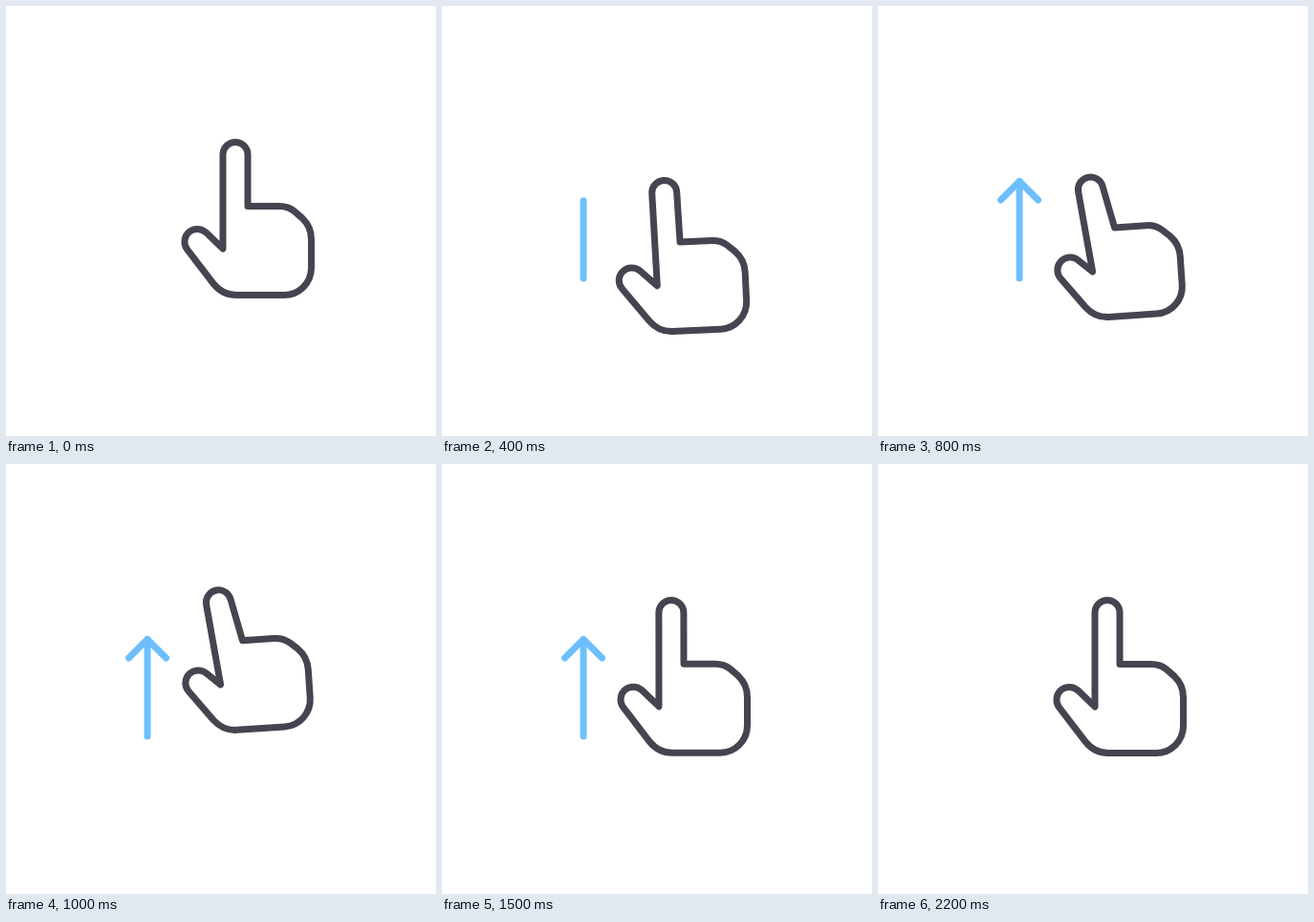
Animation, 450 px wide and 450 px high, one loop 2.4 s. Source, as an HTML page:

```html
<!DOCTYPE html>
<html lang="en">
<head>
<meta charset="utf-8">
<title>Swipe up</title>
<style>
  html, body { margin: 0; width: 100%; height: 100%; overflow: hidden; background: #fff; }
  svg { display: block; width: 100%; height: 100%; }
  path { fill: none; stroke-width: 7; stroke-linecap: round; stroke-linejoin: round; }
  #hand { stroke: #464450; }
  #arrow path { stroke: #6dbffc; }
</style>
</head>
<body>
<svg viewBox="0 0 450 450">
  <g id="arrow"><path id="stem"/><path id="head"/></g>
  <path id="hand"/>
</svg>
<script>
const LOOP = 2400, STEP = 100;
const DOWN_END = 618, UP_END = 1057, REST = 1527;
const LOW = 52.7, HIGH = -28.5, TILT = -3.9;
const [arrow, stem, head, hand] = ['arrow', 'stem', 'head', 'hand'].map(id => document.getElementById(id));

const ramp = (t, from, to) => Math.min(1, Math.max(0, (t - from) / (to - from)));
const ease = (t, from, to) => {
  const s = ramp(t, from, to);
  return s * s * (3 - 2 * s);
};

// curl bends the index finger and tucks the thumb, 0 = straight
function handPath(curl) {
  const at = (x, y, dx, dy) => `${x + dx * curl} ${y + dy * curl}`;
  const thumbRight = at(209.4, 237.1, 3.5, 4);
  const thumbLeft = at(189.5, 254.6, 3.5, 4);
  return `M${thumbRight} L227 254 L${at(227, 155.5, -9.2, 14.7)}
    A13 13 0 0 1 ${at(253, 155.5, -9.4, 10.5)} L253 209.5 H286
    Q295.5 209.5 302 215 L310 222 Q319.5 231 319.5 244 V274
    A28.5 28.5 0 0 1 291 302.5 H241 C231 302.5 223 298 217 290.5
    L${thumbLeft} A13.3 13.3 0 0 1 ${thumbRight} Z`;
}

function drawHand(t) {
  const down = ease(t, 0, DOWN_END);
  const y = LOW * down + (HIGH - LOW) * ease(t, DOWN_END, UP_END) - HIGH * ease(t, UP_END, REST);
  const tilt = TILT * (down - ease(t, UP_END, 1300));
  const curl = ease(t, 350, DOWN_END) - ease(t, UP_END, REST);
  hand.setAttribute('d', handPath(curl));
  hand.setAttribute('transform', `translate(0 ${y}) rotate(${tilt} 250 290)`);
}

function drawArrow(t) {
  const grow = ease(t, 100, 521);
  const spread = 19.5 * ease(t, 500, 620);
  stem.setAttribute('d', grow ? `M148 285 V${285 - 101.5 * grow}` : '');
  head.setAttribute('d', spread ? `M${148 - spread} ${183.5 + spread} L148 183.5 l${spread} ${spread}` : '');
  arrow.setAttribute('opacity', 1 - ramp(t, 1900, 2200));
}

const start = performance.now();
function tick() {
  const elapsed = (performance.now() - start) % LOOP;
  const t = Math.floor(elapsed / STEP) * STEP;
  drawHand(t);
  drawArrow(t);
  requestAnimationFrame(tick);
}
tick();
</script>
</body>
</html>
```
